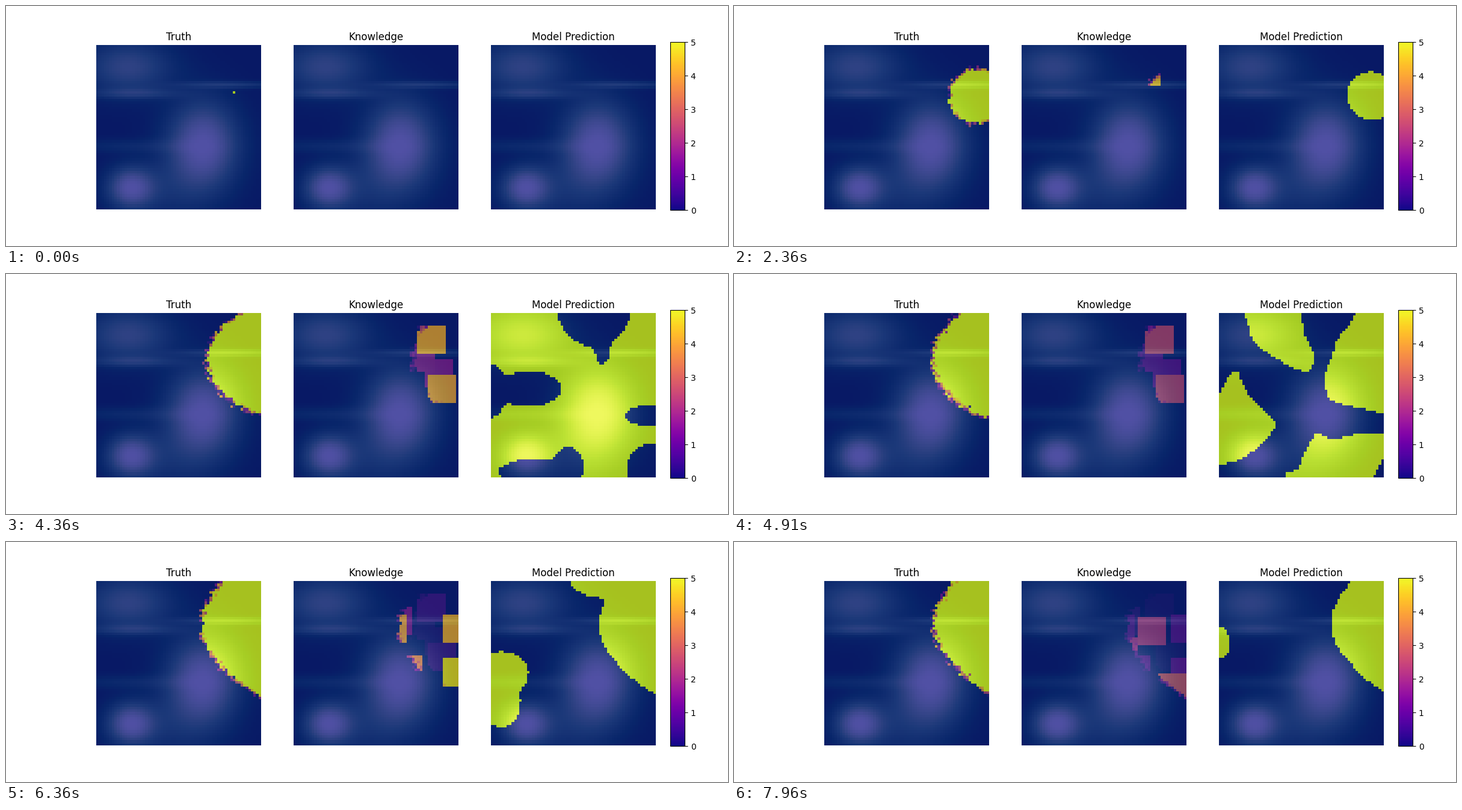
Recreate the animation shown at these times as a matplotlib script. Size 1200 by 400 pixels, loop 8000 ms.

```python
import numpy as np
import matplotlib.pyplot as plt
from matplotlib.animation import FuncAnimation
from matplotlib.cm import ScalarMappable
from matplotlib.colors import Normalize

N, FRAMES, STEP = 64, 160, 50
VIEW = 11             # side of an observation window, in cells
CADENCE = 0.96        # seconds between an observer's stops

yy, xx = np.mgrid[0:N, 0:N] + 0.5
jitter = np.random.default_rng(7).normal(-0.1, 0.5, (N, N))


def radius(cx, cy, rx, ry):
    return np.hypot((xx - cx) / rx, (yy - cy) / ry)


# --- terrain: three hills, three thin ridges, one broad swell -------------
def bump(height, *shape):
    return height * np.exp(-radius(*shape) ** 2 / 2)


hills = bump(0.91, 41.5, 39, 9.3, 11.5) + bump(0.82, 13.4, 55.6, 6.2, 5.4) \
    + bump(0.53, 12.4, 8.6, 12, 7.2)
ridges = bump(0.34, 52, 15.5, 14, 0.9) + bump(0.31, 15, 18.8, 12, 1.4) \
    + bump(0.16, 12, 39.3, 18, 1.8)
terrain = np.clip(hills + ridges + bump(0.2, 28, 57, 12, 9), 0, 0.94)


# --- fire: a disc that drifts right, then stretches along the right edge --
def depth(t):
    """Distance inside the fire front, in cells."""
    drift = min(1, t / 2.36)
    dx, dy = xx - 53.5 - 5.7 * drift, yy - 18.5 - 1.35 * drift
    dist = np.hypot(dx, dy) + 1e-9
    left, up = -dx / dist, -dy / dist
    stretch = np.clip((t - 2.36) / 4, 0, 1.15)
    size = 0.47 + 17.1 * np.sin(np.pi * t / 12.5)
    return size * (1 + stretch * (0.15 * up + 0.4 * (1 - left) ** 2)) - dist


def truth(t):
    edge = min(1.3, 0.05 + t)
    return 5 * np.clip(1 + depth(t) / edge + jitter, 0, 1)


# --- observers: each tour looks through one window per stop ---------------
TOURS = {
    2.16: [(43, 5), (44, 12), (48, 5), (35, 10), (33, 13), (45, 14)],
    3.08: [(51, 18), (52, 24)],
    5.9: [(39, 29), (34, 22)],
    6.09: [(58, 13)],
    6.25: [(58, 30), (53, 36)],
}
LOOKS = sorted((start + i * CADENCE, col, row)
               for start, stops in TOURS.items()
               for i, (col, row) in enumerate(stops))
SEEN = [truth(look[0]) for look in LOOKS]


def knowledge(t):
    known = np.zeros((N, N))
    for (t0, col, row), seen in zip(LOOKS, SEEN):
        if t0 <= t:
            box = np.s_[row:row + VIEW, col:col + VIEW]
            known[box] = seen[box] * np.exp(t0 - t)
    return known


# --- prediction: the fire front, with merged ovals as errors --------------
def ovals(*shapes):
    return [min(s[2:]) * (1 - radius(*s)) for s in shapes]


def merge(parts):
    return np.logaddexp.reduce(parts, axis=0)


def front(t, *false_alarms):
    return merge([depth(t) - 0.6, *ovals(*false_alarms)])


def all_but(*gaps):
    return -merge(ovals(*gaps))


STAGES = {
    0: front(0),
    2.36: front(2.36),
    3.36: all_but((2, 3, 8, 9.5), (38, -1, 15, 14), (43, 23, 4.5, 11),
                  (50.5, 43.7, 4.5, 5.5), (2, 52, 10.5, 15), (16, 64, 18, 10.5)),
    4.36: all_but((40, -1, 14, 14), (43.3, 13, 3, 7), (0, 30, 6, 10.5),
                  (15, 29.5, 12.5, 7), (61, 40, 9, 4), (16, 62, 13, 5),
                  (30, 60, 6, 8), (63, 61, 10.5, 10.5)),
    5.46: front(5.46, (31, 2, 7, 12), (40, 1, 9, 7), (5, 32, 13, 8.5),
                (4, 47, 7, 10), (32, 63, 8, 9.5), (61, 60, 11, 10.5)),
    6.36: front(6.36, (45, 0, 14, 6.5), (4, 36, 10.5, 8.5), (4, 47, 7.5, 10)),
    7.96: front(7.96, (0, 24, 4.2, 6.5)),
}
TIMES = list(STAGES)


def prediction(t):
    i = min(np.searchsorted(TIMES, t, side="right"), len(TIMES) - 1)
    a, b = TIMES[i - 1], TIMES[i]
    w = (t - a) / (b - a)
    return 5.0 * ((1 - w) * STAGES[a] + w * STAGES[b] > 0)


# --- figure ---------------------------------------------------------------
PANELS = {"Truth": truth, "Knowledge": knowledge, "Model Prediction": prediction}
norm = Normalize(0, 5)

fig, axes = plt.subplots(1, 3, figsize=(12, 4), dpi=100)
layers = []
for ax, (title, field) in zip(axes, PANELS.items()):
    ax.imshow(terrain, cmap="Greens_r", vmin=0, vmax=1, interpolation="nearest")
    layers.append(ax.imshow(field(0), cmap="plasma", norm=norm, alpha=0.7,
                            interpolation="nearest"))
    ax.set_title(title)
    ax.axis("off")
fig.colorbar(ScalarMappable(norm, "plasma"), cax=fig.add_axes([0.92, 0.15, 0.02, 0.7]))


def update(frame):
    t = frame * STEP / 1000
    for layer, field in zip(layers, PANELS.values()):
        layer.set_data(field(t))
    return layers


anim = FuncAnimation(fig, update, frames=FRAMES, interval=STEP, repeat=True,
                     repeat_delay=0, blit=False)
plt.show()
```
